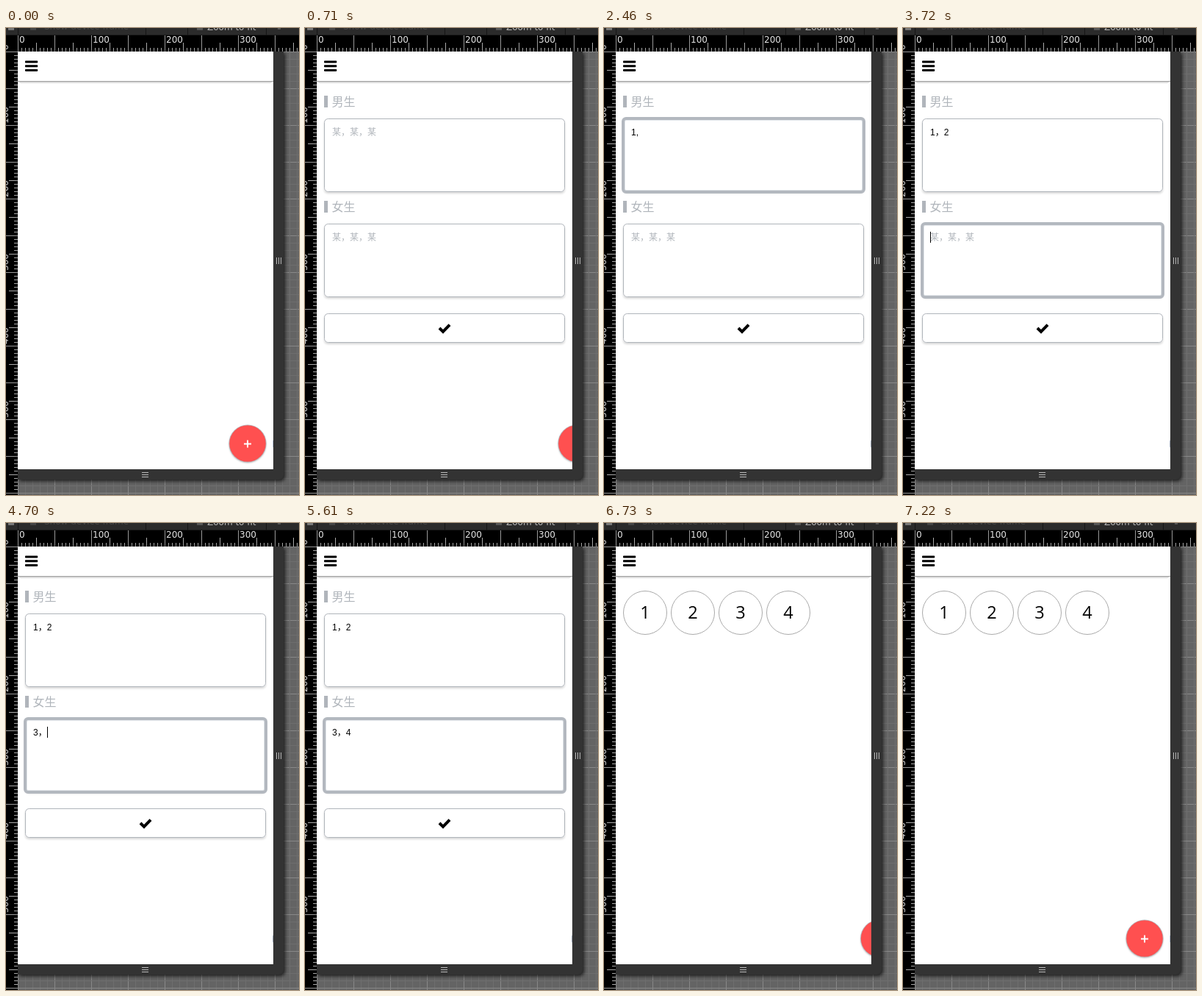
Animation, 399 px wide and 635 px high, one loop 7.99 s. Source, as an HTML page with a canvas:

```html
<!DOCTYPE html>
<html lang="zh-CN">
<head>
<meta charset="utf-8">
<title>Name form</title>
<style>
html, body { margin: 0; width: 100%; height: 100%; overflow: hidden; background: #666; }
canvas { display: block; width: 399px; height: 635px; }
</style>
</head>
<body>
<canvas id="stage"></canvas>
<script>
const W = 399, H = 635, LOOP = 7990, STEP = 70, FIRST = 500;
const canvas = document.getElementById('stage');
const ratio = window.devicePixelRatio || 1;
canvas.width = W * ratio;
canvas.height = H * ratio;
const ctx = canvas.getContext('2d');
ctx.scale(ratio, ratio);

const GREY = '#b0b5bb';
const UI = '"DejaVu Sans", sans-serif';
const FORM = '"Liberation Sans", "Noto Sans CJK SC", "Noto Sans CJK JP", "Noto Sans CJK", sans-serif';
const CJK = '"Noto Sans CJK SC", "Noto Sans CJK JP", "Noto Sans CJK", sans-serif';
const HINT = '某，某，某';

// start time, focused field, its text, caret visible
const typing = [
  [0, -1, '', false],
  [1410, 0, '', true],
  [1690, 0, '1', true],
  [1900, 0, '1,', true],
  [2460, 0, '1,', false],
  [2530, 0, '1', true],
  [2880, 0, '1，', true],
  [3230, 0, '1，2', true],
  [3720, 1, '', true],
  [4210, 1, '', false],
  [4420, 1, '3', true],
  [4700, 1, '3，', true],
  [5120, 1, '3，4', true],
  [5610, 1, '3，4', false],
  [6100, 2, '', false]
];

function rect(x, y, w, h, color) {
  ctx.fillStyle = color;
  ctx.fillRect(x, y, w, h);
}

function text(str, x, y, font, color, align = 'left') {
  ctx.font = font;
  ctx.fillStyle = color;
  ctx.textAlign = align;
  ctx.fillText(str, x, y);
}

function roundPath(x, y, w, h, r) {
  ctx.beginPath();
  ctx.roundRect(x, y, w, h, r);
}

function disc(x, y, r) {
  ctx.beginPath();
  ctx.arc(x, y, r, 0, Math.PI * 2);
}

function shadow(color, blur, dx, dy) {
  ctx.shadowColor = color;
  ctx.shadowBlur = blur * ratio;
  ctx.shadowOffsetX = dx * ratio;
  ctx.shadowOffsetY = dy * ratio;
}

function noShadow() {
  shadow('transparent', 0, 0, 0);
}

// cubic-bezier(.25, .1, .25, 1)
function ease(p) {
  if (p <= 0) return 0;
  if (p >= 1) return 1;
  let lo = 0, hi = 1, u = 0.5;
  const curve = (u, a, b) => 3 * a * u * (1 - u) ** 2 + 3 * b * u * u * (1 - u) + u ** 3;
  for (let i = 0; i < 24; i++) {
    u = (lo + hi) / 2;
    if (curve(u, 0.25, 0.25) < p) lo = u; else hi = u;
  }
  return curve(u, 0.1, 1);
}

function drawGrid() {
  rect(0, 0, W, H, '#646464');
  for (let d = 0; d < 640; d += 10) {
    const color = d % 50 ? '#6e6e6e' : '#888';
    rect(16 + d, 32, 1, H, color);
    rect(16, 32 + d, W, 1, color);
  }
}

function drawRulers() {
  rect(0, 10, W, 22, '#000');
  rect(0, 10, 16, H, '#000');
  for (let d = 0; d < 605; d += 5) {
    const len = d % 50 === 0 ? 22 : d % 25 === 0 ? 12 : 5;
    const color = d % 50 === 0 ? '#999' : '#aaa';
    if (d < 385) rect(16 + d, 32 - len, 1, len, color);
    rect(Math.max(0, 16 - len), 32 + d, Math.min(16, len), 1, color);
  }
  for (let d = 0; d < 600; d += 100) {
    if (d < 400) text(String(d), 18 + d, 20, '12px ' + UI, '#e4e4e4');
    ctx.save();
    ctx.translate(3, 30 + d);
    ctx.rotate(-Math.PI / 2);
    text(String(d), 0, 0, '12px ' + UI, '#ccc');
    ctx.restore();
  }
}

function drawToolbar() {
  rect(0, 0, W, 10, '#2b2b2b');
  rect(0, 9, W, 1, '#1c1c1c');
  for (const x of [16, 190, 247, 354]) rect(x, 0, 1, 10, '#161616');
  rect(3, 0, 8, 3, '#777');
  rect(33, 0, 8, 3, '#444');
  rect(260, 0, 8, 3, '#555');
  rect(370, 0, 4, 2, '#555');
  text('Show device frame', 52, 2, '12px ' + UI, '#484848');
  text('Zoom to fit', 274, 3, '12px ' + UI, '#b8b8b8');
}

function drawDevice() {
  shadow('rgba(0,0,0,.75)', 5, 2, 2);
  ctx.fillStyle = '#333';
  roundPath(16, 32, 362, 582, [0, 0, 6, 0]);
  ctx.fill();
  noShadow();
  for (let i = 0; i < 3; i++) {
    rect(368 + 3 * i, 312, 1, 9, '#bbb');
    rect(185, 604 + 3 * i, 9, 1, '#bbb');
  }
  rect(16, 32, 348, 568, '#fff');
}

function drawHeader() {
  rect(16, 72, 348, 1, '#a5a5a5');
  rect(18, 73, 344, 1, '#cfcfcf');
  rect(19, 74, 342, 1, '#e8e8e8');
  rect(20, 75, 340, 1, '#f7f7f7');
  ctx.fillStyle = '#000';
  for (const y of [44.6, 50.3, 56]) {
    roundPath(26, y, 17.2, 2.9, 0.8);
    ctx.fill();
  }
}

function drawBox(y, h) {
  shadow('rgba(0,0,0,.16)', 3, 0, 2);
  roundPath(26, y, 328, h, 5);
  ctx.fillStyle = '#fff';
  ctx.fill();
  noShadow();
  roundPath(26.5, y + 0.5, 327, h - 1, 5);
  ctx.strokeStyle = GREY;
  ctx.lineWidth = 1;
  ctx.stroke();
}

function drawRing(y, h, out) {
  const w = out + 2, m = out - w / 2;
  roundPath(27.5, y + 1.5, 325, h - 3, 3);
  ctx.strokeStyle = '#e3e7eb';
  ctx.lineWidth = 3;
  ctx.stroke();
  roundPath(26 - m, y - m, 328 + 2 * m, h + 2 * m, 4);
  ctx.strokeStyle = '#b3b8bf';
  ctx.lineWidth = w;
  ctx.stroke();
}

function drawField(i, title, value, focused, caret) {
  const y = 123 + 143 * i;
  rect(26, y - 31, 5, 16, GREY);
  text(title, 36.5, y - 17, '500 16px ' + CJK, GREY);
  drawBox(y, 100);
  if (focused) drawRing(y, 100, 2);
  const font = '12px ' + FORM;
  if (value) text(value, 37, y + 23, font, '#000');
  else text(HINT, 37, y + 23, '12px ' + CJK, GREY);
  if (caret) {
    ctx.font = font;
    rect(37 + Math.round(ctx.measureText(value).width), y + 11, 1, 15, '#000');
  }
}

function drawForm(t) {
  const values = ['', ''];
  let focus = -1, caret = false;
  for (const [start, field, value, on] of typing) {
    if (t < start) break;
    focus = field;
    caret = on;
    if (field === 0 || field === 1) values[field] = value;
  }
  ['男生', '女生'].forEach((title, i) =>
    drawField(i, title, values[i], focus === i, caret && focus === i));

  drawBox(388, 40);
  if (focus === 2) drawRing(388, 40, t < 6170 ? 4 : 2);
  ctx.beginPath();
  ctx.moveTo(183, 408);
  ctx.lineTo(188, 413);
  ctx.lineTo(197, 403.6);
  ctx.strokeStyle = '#000';
  ctx.lineWidth = 4;
  ctx.stroke();
}

function drawNames() {
  for (let i = 0; i < 4; i++) {
    const x = 56 + 65 * i;
    disc(x, 122, 29.5);
    ctx.strokeStyle = '#aaa';
    ctx.lineWidth = 1;
    ctx.stroke();
    text(String(i + 1), x, 129.5, '23.5px "Open Sans", "Noto Sans", sans-serif', '#000', 'center');
  }
}

function drawAddButton(t) {
  const shift = 60 * (ease((t - 470) / 600) - ease((t - 6625) / 600));
  const x = 329 + shift, y = 565;
  ctx.save();
  ctx.beginPath();
  ctx.rect(16, 32, 348, 568);
  ctx.clip();
  rect(363, 561, 1, 9, '#c3cfe6');
  shadow('rgba(0,0,0,.25)', 2, 0, 1);
  disc(x, y, 25.5);
  ctx.fillStyle = GREY;
  ctx.fill();
  noShadow();
  disc(x, y, 24.8);
  ctx.fillStyle = '#ff5050';
  ctx.fill();
  rect(x - 5, y - 0.5, 10, 2, '#fff');
  rect(x - 1, y - 4.5, 2, 10, '#fff');
  ctx.restore();
}

function draw(ms) {
  const t = FIRST + Math.floor((ms - FIRST) / STEP + 1e-6) * STEP;
  drawGrid();
  drawRulers();
  drawToolbar();
  drawDevice();
  drawHeader();
  if (t >= 6730) drawNames();
  else if (t >= 500) drawForm(t);
  drawAddButton(t);
}

const begin = performance.now();
function tick() {
  draw((performance.now() - begin) % LOOP);
  requestAnimationFrame(tick);
}
tick();
</script>
</body>
</html>
```
